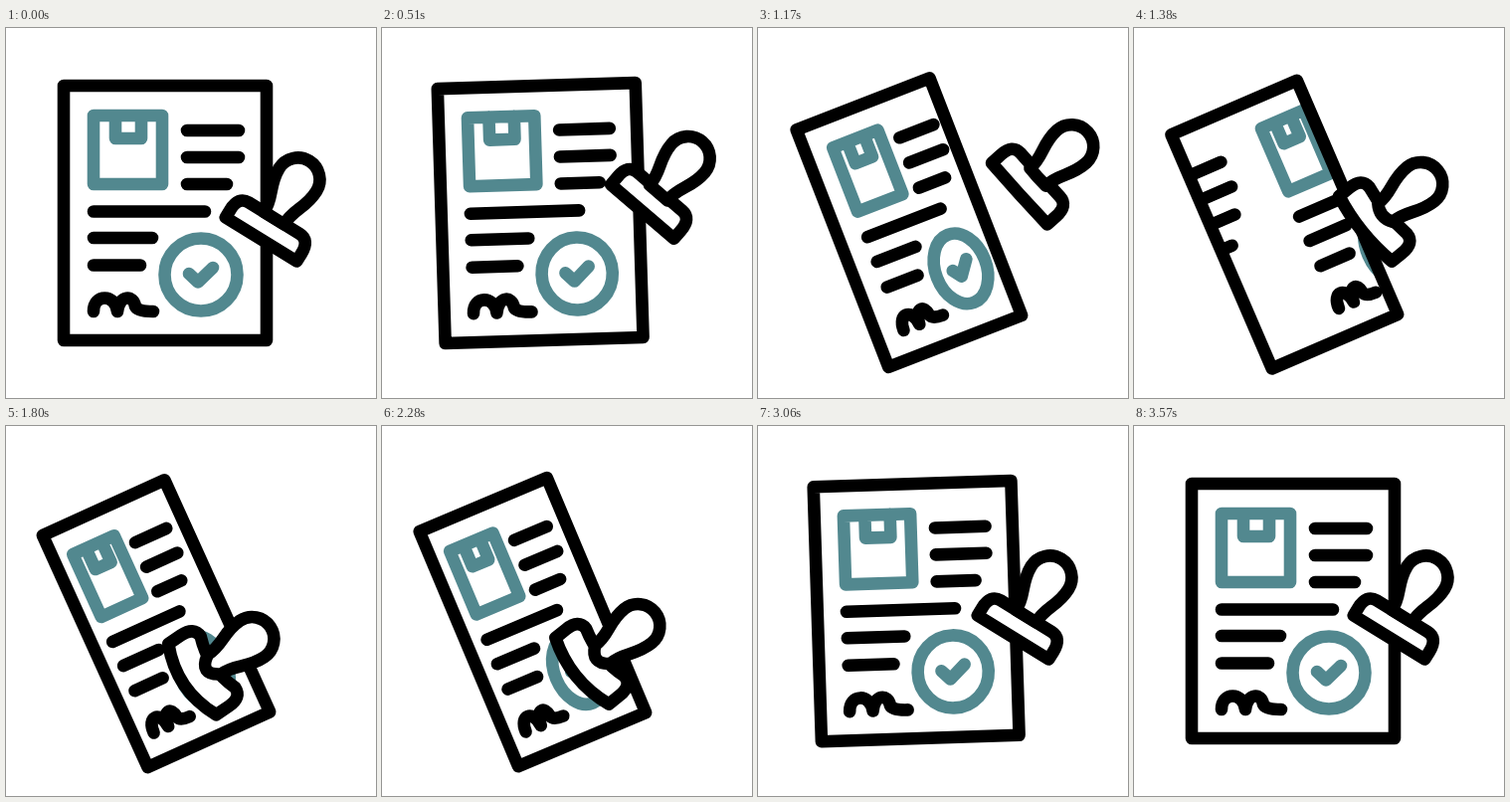
An HTML page with a canvas that plays this animation: 372 by 372 pixels, repeating every 3.6 s.

```html
<!DOCTYPE html>
<html lang="en">
<head>
<meta charset="utf-8">
<title>Document stamp</title>
<style>
html, body { margin: 0; width: 100%; height: 100%; overflow: hidden; background: #fff; }
canvas { display: block; width: 372px; height: 372px; }
</style>
</head>
<body>
<canvas id="stage" width="372" height="372"></canvas>
<script>
const ctx = document.getElementById('stage').getContext('2d');
const LOOP = 3600, STEP = 30;
const BLACK = '#000', TEAL = '#52888f';
const PAGE_PITCH = 221;

// Page artwork, measured from the centre of the page.
const sheet = new Path2D('M-102-128H102V128H-102Z');
const parcel = new Path2D('M-72-98H-3V-29H-72ZM-50-98V-75H-24V-98');
const textLines = new Path2D(
  'M22-83H74M22-56H74M22-29H62M-72-1.5H40M-72 25H-13M-72 52.5H-25' +
  'M-72 99C-72 81-50 81-48 99C-46 82-32 82-30 94Q-28 99-12 99');
const seal = new Path2D('M72.5 62A36.5 36.5 0 1 1-.5 62A36.5 36.5 0 1 1 72.5 62Z');
const tick = new Path2D('M24 61L33 69.5L48 55');

// Stamp poses: base centre, lean in degrees, half width, head height, bow of the base.
const REST = [256.5, 212.5, 31.6, 42, 25, 0];
const RAISED = [266, 163, 47.5, 41.5, 28, 0];
const PRESSED = [189, 253.5, 56, 43, 29, 1];

const mix = (a, b, k) => a + (b - a) * k;
const mixPose = (a, b, k) => a.map((v, i) => mix(v, b[i], k));

// Symmetric cubic Bézier easing, solved by bisection.
function ease(t, start, end) {
  const x = Math.min(1, Math.max(0, (t - start) / (end - start)));
  if (x === 0 || x === 1) return x;
  const a = 0.765;
  let lo = 0, hi = 1;
  for (let i = 0; i < 24; i++) {
    const s = (lo + hi) / 2, r = 1 - s;
    if (3 * s * r * r * a + 3 * s * s * r * (1 - a) + s * s * s < x) lo = s;
    else hi = s;
  }
  return lo * lo * (3 - 2 * lo);
}

// Transforms the shape but keeps the line weight constant.
function placed(path, matrix) {
  const out = new Path2D();
  out.addPath(path, matrix);
  return out;
}

function outline(path, matrix, color, fill) {
  const shape = placed(path, matrix);
  if (fill) {
    ctx.fillStyle = fill;
    ctx.fill(shape);
  }
  ctx.strokeStyle = color;
  ctx.stroke(shape);
}

function drawContents(matrix, offset, sealed) {
  const m = matrix.translate(offset, 0);
  outline(parcel, m, TEAL);
  outline(textLines, m, BLACK);
  if (sealed) {
    outline(seal, m, TEAL);
    outline(tick, m, TEAL);
  }
}

function drawPage(t) {
  const tilt = t < 1800 ? ease(t, 0, 1800) : 1 - ease(t, 1800, 3570);
  const matrix = new DOMMatrix()
    .translate(160 - 11.5 * tilt + 2.5 * tilt * tilt, 186 + 12.7 * tilt * tilt)
    .rotate(-24.4 * tilt)
    .scale(1 - 0.34 * tilt, 1);
  const slide = ease(t, 984, 1800);

  ctx.save();
  ctx.clip(placed(sheet, matrix));
  if (slide < 1) drawContents(matrix, PAGE_PITCH * slide, true);
  if (slide > 0) drawContents(matrix, PAGE_PITCH * (slide - 1), t >= 1770);
  ctx.restore();
  outline(sheet, matrix, BLACK);
}

function stampPose(t) {
  if (t < 990) return mixPose(REST, RAISED, ease(t, 0, 990));
  if (t < 1800) return mixPose(RAISED, PRESSED, ease(t, 990, 1800));
  return mixPose(PRESSED, REST, ease(t, 1800, 3000));
}

function drawStamp(t) {
  const [x, y, lean, half, height, bow] = stampPose(t);
  const matrix = new DOMMatrix().translate(x, y).rotate(lean);
  const base = 2 * bow;

  const head = new Path2D();
  head.moveTo(-half, base);
  head.lineTo(-half, 16 - height);
  head.quadraticCurveTo(-half, -height, 12 - half, -height);
  head.quadraticCurveTo(0, 12 * bow - height, half - 12, -height);
  head.quadraticCurveTo(half, -height, half, 16 - height);
  head.lineTo(half, base);
  head.quadraticCurveTo(0, base + 20 * bow, -half, base);
  head.closePath();

  const handle = new Path2D();
  handle.moveTo(-12, -25);
  handle.bezierCurveTo(-11, -42, -22, -50, -22, -70.5);
  handle.arc(0, -70.5, 22, Math.PI, 0);
  handle.bezierCurveTo(22, -50, 11, -42, 12, -25);
  handle.quadraticCurveTo(0, -25 + 20 * bow, -12, -25);
  handle.closePath();

  outline(head, matrix, BLACK, '#fff');
  outline(handle, matrix, BLACK, '#fff');
}

function draw(now) {
  const t = Math.floor((now % LOOP) / STEP) * STEP;
  ctx.fillStyle = '#fff';
  ctx.fillRect(0, 0, 372, 372);
  ctx.lineWidth = 12.6;
  ctx.lineCap = ctx.lineJoin = 'round';
  drawPage(t);
  drawStamp(t);
}

let start;
function tickFrame(now) {
  if (start === undefined) start = now;
  draw(now - start);
  requestAnimationFrame(tickFrame);
}
draw(0);
requestAnimationFrame(tickFrame);
</script>
</body>
</html>
```
